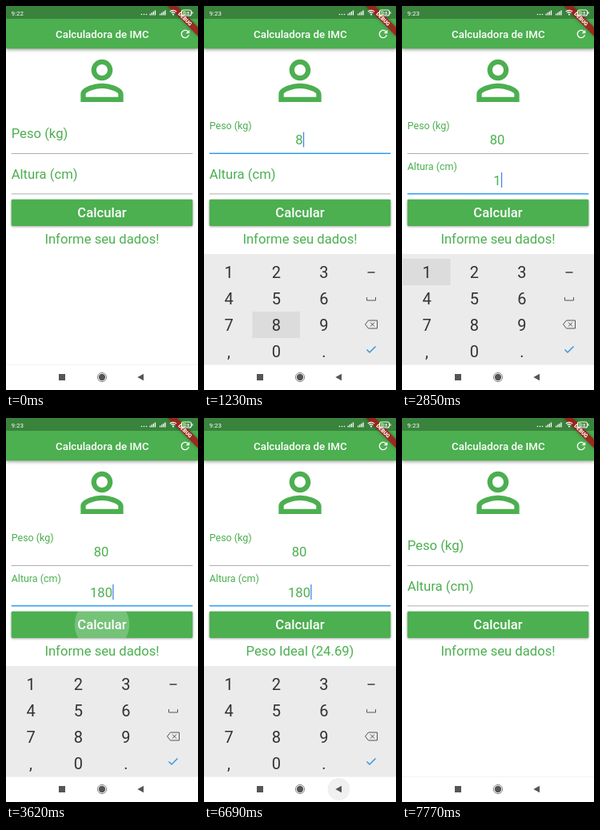
Animation of 240x480 px, one loop 8 s. Source, as an HTML page with a canvas:

```html
<!DOCTYPE html>
<html lang="pt">
<head>
<meta charset="utf-8">
<style>
html, body { margin: 0; width: 100%; height: 100%; overflow: hidden; background: #fff; }
canvas { display: block; }
</style>
</head>
<body>
<canvas id="stage" width="240" height="480"></canvas>
<script>
const ctx = document.getElementById('stage').getContext('2d');
const LOOP = 8000;
const GREEN = '#4caf50', BLUE = '#2196f3', INK = '#333';

const PERSON = new Path2D('M12 5.9c1.16 0 2.1.94 2.1 2.1s-.94 2.1-2.1 2.1S9.9 9.16 9.9 8s.94-2.1 2.1-2.1m0 9c2.97 0 6.1 1.46 6.1 2.1v1.1H5.9V17c0-.64 3.13-2.1 6.1-2.1M12 4C9.79 4 8 5.79 8 8s1.79 4 4 4 4-1.79 4-4-1.79-4-4-4zm0 9c-2.67 0-8 1.34-8 4v3h16v-3c0-2.66-5.33-4-8-4z');
const REFRESH = new Path2D('M17.65 6.35C16.2 4.9 14.21 4 12 4c-4.42 0-7.99 3.58-7.99 8s3.57 8 7.99 8c3.73 0 6.84-2.55 7.73-6h-2.08c-.82 2.33-3.04 4-5.65 4-3.31 0-6-2.69-6-6s2.69-6 6-6c1.66 0 3.14.69 4.22 1.78L13 11h7V4l-2.35 2.35z');

// Timeline in ms
const CLOCK_TICK = 770, FOCUS_WEIGHT = 160, FOCUS_HEIGHT = 2310, BLUR = 7060;
const CALC = 3690, BACK = 6690, RESET = 7450;
const KEY_PRESSES = [[1230, 1, 2], [1540, 1, 3], [2770, 0, 0], [3080, 1, 2], [3310, 1, 3]];
const FIELDS = [
  { label: 'Peso (kg)', y: 0, focus: FOCUS_WEIGHT, blur: FOCUS_HEIGHT,
    typed: [[1230, '8'], [1540, '80']],
    cursor: [[160, 660], [1160, 2080]] },
  { label: 'Altura (cm)', y: 50.5, focus: FOCUS_HEIGHT, blur: BLUR,
    typed: [[2770, '1'], [3080, '18'], [3310, '180']],
    cursor: [[2310, 3810], [4310, 4770], [5310, 5850], [6230, 7000]] }
];

const progress = (t, start, length) => Math.min(1, Math.max(0, (t - start) / length));
const smooth = u => u * u * (3 - 2 * u);
const within = (t, [a, b]) => t >= a && t < b;

function rect(x, y, w, h, color) {
  ctx.fillStyle = color;
  ctx.fillRect(x, y, w, h);
}

function text(s, x, y, size, color, align = 'left', weight = 400) {
  ctx.font = `${weight} ${size}px Roboto, sans-serif`;
  ctx.textAlign = align;
  ctx.fillStyle = color;
  ctx.fillText(s, x, y);
}

function circle(x, y, r, color) {
  ctx.fillStyle = color;
  ctx.beginPath();
  ctx.arc(x, y, r, 0, 7);
  ctx.fill();
}

function polyline(points, color, width, closed) {
  ctx.beginPath();
  points.forEach(([x, y]) => ctx.lineTo(x, y));
  if (closed) ctx.closePath();
  ctx.strokeStyle = color;
  ctx.lineWidth = width;
  ctx.stroke();
}

function icon(path, x, y, size, color) {
  ctx.save();
  ctx.translate(x, y);
  ctx.scale(size / 24, size / 24);
  ctx.fillStyle = color;
  ctx.fill(path);
  ctx.restore();
}

function shadowed(blur, dy, draw) {
  ctx.save();
  ctx.shadowColor = 'rgba(0,0,0,.35)';
  ctx.shadowBlur = blur;
  ctx.shadowOffsetY = dy;
  draw();
  ctx.restore();
}

function ripple(t, start, x, y, radius) {
  const u = progress(t, start, 380);
  if (u > 0 && u < 1) circle(x, y, radius * Math.sqrt(u), `rgba(255,255,255,${0.25 * (1 - u)})`);
}

function appBar(t) {
  shadowed(4, 1.5, () => rect(0, 0, 240, 53.3, GREEN));
  rect(0, 0, 240, 16, '#39833c');
  text('Calculadora de IMC', 120.3, 40, 13.33, '#fff', 'center', 500);
  ripple(t, 7360, 224, 35, 23);
  icon(REFRESH, 216, 27, 16, '#fff');
}

function debugBanner() {
  ctx.save();
  ctx.translate(240, 0);
  ctx.rotate(Math.PI / 4);
  shadowed(4, 0, () => rect(-26.7, 18.7, 53.4, 8, 'rgba(170,28,28,.85)'));
  text('DEBUG', 0, 25.1, 6.6, '#fff', 'center', 900);
  ctx.restore();
}

function statusBar(t) {
  text(t < CLOCK_TICK ? '9:22' : '9:23', 6.5, 11.5, 8, '#fff');
  for (let i = 0; i < 3; i++) circle(169.5 + i * 3, 10.5, 0.8, '#fff');
  for (const x of [179.5, 192])
    for (let i = 0; i < 4; i++) rect(x + i * 2.1, 9.7 - i * 1.4, 1.3, 1.8 + i * 1.4, '#fff');
  ctx.strokeStyle = '#fff';
  ctx.lineWidth = 1.1;
  for (const r of [3.2, 5.6]) {
    ctx.beginPath();
    ctx.arc(209, 11, r, -2.4, -0.74);
    ctx.stroke();
  }
  circle(209, 10.6, 1.1, '#fff');
  ctx.beginPath();
  ctx.roundRect(219.5, 5, 12, 7, 2);
  ctx.stroke();
  rect(232.5, 7, 1, 3, '#fff');
  rect(220.5, 6, 3, 5, '#6fdc55');
  text('28', 226, 10.8, 6, '#fff', 'center', 500);
}

function field(t, { label, y, focus, blur, typed, cursor }) {
  const float = smooth(progress(t, focus, 200)) - smooth(progress(t, RESET, 200));
  text(label, 6.7, 165 + y - 11 * float, 16.67 - 4.17 * float, GREEN);

  let value = '';
  if (t < RESET) for (const [at, s] of typed) if (t >= at) value = s;
  text(value, 119, 173 + y, 16.67, GREEN, 'center');
  if (cursor.some(span => within(t, span)))
    rect(119.2 + ctx.measureText(value).width / 2, 157.5 + y, 1.3, 19, '#4285f4');

  if (within(t, [focus, blur])) rect(6.7, 183.6 + y, 226.6, 1.4, BLUE);
  else rect(6.7, 184 + y, 226.6, 0.8, '#999');
}

function button(t) {
  ctx.save();
  ctx.beginPath();
  ctx.roundRect(6.7, 241.7, 226.6, 33.3, 1.4);
  ctx.fillStyle = GREEN;
  shadowed(3, 1, () => ctx.fill());
  ctx.clip();
  ripple(t, CALC - 100, 120, 258, 120);
  ctx.restore();
  text('Calcular', 120, 264, 16.67, '#fff', 'center', 500);
}

function keyboard(t) {
  const dy = 170 * (t < 2000 ? (1 - progress(t, 540, 330)) ** 3 : progress(t, 6980, 170) ** 1.5);
  if (dy >= 170) return;
  ctx.save();
  ctx.translate(0, dy);
  rect(0, 310, 240, 138, '#ebebeb');
  for (const [at, col, row] of KEY_PRESSES)
    if (within(t, [at - 60, at + 90])) rect(1 + col * 59.5, 316 + row * 33, 59.5, 33, '#dcdcdc');
  ['123', '456', '789', ',0.'].forEach((keys, row) =>
    [...keys].forEach((key, col) => text(key, 31 + col * 59.4, 340 + row * 33, 20, INK, 'center')));
  polyline([[204.5, 333], [213.5, 333]], INK, 1.4);
  polyline([[203.5, 364], [203.5, 368], [214.5, 368], [214.5, 364]], '#555', 1);
  polyline([[201.5, 398], [205.5, 393], [216.5, 393], [216.5, 403], [205.5, 403]], '#555', 1, true);
  polyline([[208, 395.5], [213, 400.5]], '#555', 1);
  polyline([[213, 395.5], [208, 400.5]], '#555', 1);
  polyline([[203.5, 429.5], [207, 433], [214.5, 425.5]], '#3b96dd', 1.5);
  ctx.restore();
}

function navBar(t) {
  rect(0, 448, 240, 0.7, 'rgba(0,0,0,.07)');
  if (within(t, [BACK, 7120])) circle(168.5, 464, 14, 'rgba(0,0,0,.06)');
  rect(66, 460, 8, 8, '#555');
  circle(120, 464, 4.2, '#555');
  ctx.beginPath();
  ctx.arc(120, 464, 5.6, 0, 7);
  ctx.strokeStyle = '#666';
  ctx.lineWidth = 0.8;
  ctx.stroke();
  ctx.beginPath();
  ctx.moveTo(164.3, 464);
  ctx.lineTo(172, 459.7);
  ctx.lineTo(172, 468.3);
  ctx.fill();
}

function draw(t) {
  rect(0, 0, 240, 480, '#fff');
  appBar(t);
  debugBanner();
  statusBar(t);
  icon(PERSON, 80, 53.3, 80, GREEN);
  FIELDS.forEach(f => field(t, f));
  button(t);
  const result = within(t, [CALC + 80, RESET]) ? 'Peso Ideal (24.69)' : 'Informe seu dados!';
  text(result, 120, 297, 16.67, GREEN, 'center');
  keyboard(t);
  navBar(t);
}

const begin = performance.now();
function tick() {
  draw((performance.now() - begin) % LOOP);
  requestAnimationFrame(tick);
}
tick();
</script>
</body>
</html>
```
